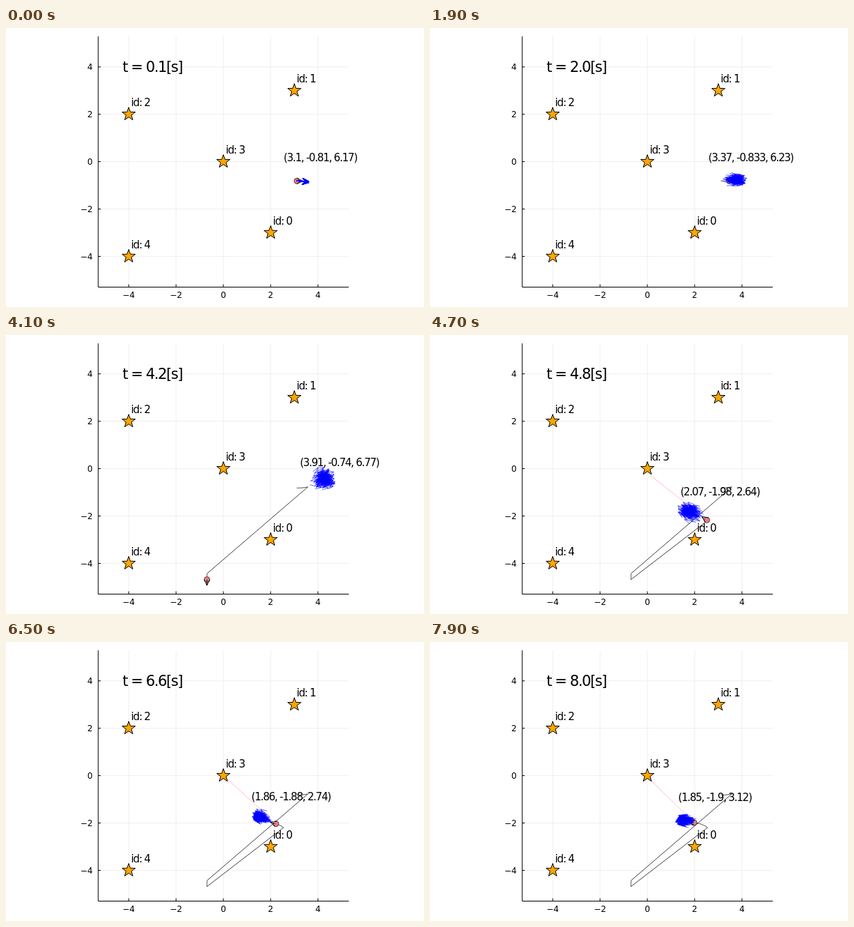
Animation, 600 px wide and 400 px high, one loop 8000 ms. Source, as an HTML page with a canvas:

```html
<!DOCTYPE html>
<html>
<head>
<meta charset="utf-8">
<style>
html, body { margin: 0; width: 100%; height: 100%; overflow: hidden; background: #fff; }
canvas { display: block; }
</style>
</head>
<body>
<canvas id="stage" width="600" height="400"></canvas>
<script>
const ctx = document.getElementById('stage').getContext('2d');
const SCALE = 33.96, SPEED = .018, RELOCATED = 46;
const px = x => 312 + SCALE * x;
const py = y => 191.6 - SCALE * y;

const landmarks = [[2, -3], [3, 3], [-4, 2], [0, 0], [-4, -4]];

// The robot drives each leg for some steps of 0.1 s, then waits to be moved.
const legs = [
  { start: 1, steps: 26, x: 3.107, y: -.815, heading: -.03, turn: .01 },
  { start: 28, steps: 14, x: -.69, y: -4.43, heading: -1.58, turn: 0 },
  { start: RELOCATED, steps: 34, x: 2.547, y: -2.19, heading: 2.55, turn: .015 }
];

function robotPath(n) {
  const path = [];
  let heading;
  for (const leg of legs.filter(leg => leg.start <= n)) {
    let { x, y } = leg;
    heading = leg.heading;
    path.push([px(x), py(y)]);
    for (let i = Math.min(n - leg.start, leg.steps); i > 0; i--) {
      x += SPEED * Math.cos(heading);
      y += SPEED * Math.sin(heading);
      heading += leg.turn;
      path.push([px(x), py(y)]);
    }
  }
  return { path, heading };
}

// Dead reckoning first, then a wobbling fix on the one landmark in view.
function estimate(n) {
  if (n >= RELOCATED) {
    const s = (n - RELOCATED) / 10;
    const wobble = -.14 * Math.cos(10 * (s - 2));
    return [2.18 - .09 * s + wobble, -2.05 + .04 * s - .65 * wobble, 2.64 + .0122 * s ** 3];
  }
  const turned = i => 6.17 + .0081 * (i / 10) ** 3;
  let x = 3.1, y = -.81;
  for (let i = 10; i <= n; i++) {
    x += .025 * Math.cos(turned(i));
    y += .025 * Math.sin(turned(i));
  }
  return [x, y, turned(n)];
}

// Particles spread while nothing is seen and gather again after a sighting.
function cloud(n) {
  if (n >= RELOCATED) {
    const extra = 4 * Math.exp((RELOCATED - n) * .3);
    return { dx: 0, dy: 0, sx: 2.6 + extra, sy: 2 + extra, turn: .17 };
  }
  const t = n / 10, grown = 1 - Math.exp(-t / 1.4);
  return { dx: 2.5 * grown, dy: -1.4 * t, sx: 4.7 * grown, sy: 1.1 * t, turn: .02 + .075 * t };
}

function random(seed) {
  return () => {
    seed = (seed + 0x6D2B79F5) | 0;
    let r = Math.imul(seed ^ seed >>> 15, seed | 1);
    r ^= r + Math.imul(r ^ r >>> 7, r | 61);
    return ((r ^ r >>> 14) >>> 0) / 4294967296;
  };
}

function line(points, color, width = 1) {
  ctx.strokeStyle = color;
  ctx.lineWidth = width;
  ctx.beginPath();
  points.forEach(p => ctx.lineTo(...p));
  ctx.stroke();
}

function fillAndOutline(fill, outline) {
  ctx.fillStyle = fill;
  ctx.fill();
  ctx.strokeStyle = outline;
  ctx.lineWidth = 1;
  ctx.stroke();
}

function arrow(x, y, angle, length, color) {
  const c = Math.cos(angle), s = -Math.sin(angle);
  const point = (along, across) => [x + c * along - s * across, y + s * along + c * across];
  const tip = point(length, 0);
  line([[x, y], tip], color);
  line([point(length - 8.5, 4), tip, point(length - 8.5, -4)], color);
}

function text(str, x, y, size, spacing = 0, align = 'center') {
  ctx.font = size + 'px "DejaVu Sans", sans-serif';
  ctx.letterSpacing = spacing + 'px';
  ctx.textAlign = align;
  ctx.fillStyle = '#000';
  ctx.fillText(str, x, y + size * .364);
}

function star(x, y) {
  ctx.beginPath();
  for (let i = 0; i < 10; i++) {
    const r = i % 2 ? 4 : 10, a = i * Math.PI / 5;
    ctx.lineTo(x + r * Math.sin(a), y - r * Math.cos(a));
  }
  ctx.closePath();
  fillAndOutline('#ffa500', '#000');
}

function drawAxes() {
  for (let v = -4; v <= 4; v += 2) {
    const x = px(v), y = py(v);
    line([[x, 12], [x, 371]], '#eee');
    line([[132, y], [492, y]], '#eee');
    line([[x, 371], [x, 367.5]], '#000');
    line([[132, y], [136, y]], '#000');
    const label = String(v).replace('-', '\u2212');
    text(label, x, 383, 12);
    text(label, 124.5, y + .3, 12, 0, 'right');
  }
  line([[132.3, 12], [132.3, 371.5], [492, 371.5]], '#000');
}

function drawRobot(n) {
  const { path, heading } = robotPath(n);
  const [x, y] = path[path.length - 1];
  line(path, '#000', .75);
  ctx.beginPath();
  ctx.arc(x, y, 4, 0, 7);
  fillAndOutline('#f08080', 'rgba(0,0,0,.65)');
  arrow(x, y, heading, 8.5, '#000');
  if (n >= RELOCATED) {
    const rnd = random(n * 31);
    line([[x, y], [312 + 11 * rnd(), 190 + 12 * rnd()]], '#ffc0cb');
  }
}

function drawCloud(n, [x, y, heading]) {
  const { dx, dy, sx, sy, turn } = cloud(n);
  const rnd = random(n < RELOCATED ? 7 : n);
  const gauss = () => (rnd() + rnd() + rnd() + rnd() - 2) * 1.73;
  for (let i = 0; i < 100; i++) {
    arrow(px(x) + dx + sx * gauss(), py(y) + dy + sy * gauss(),
      heading + turn * gauss(), 17, 'rgba(0,0,255,.6)');
  }
}

function draw(n) {
  ctx.fillStyle = '#fff';
  ctx.fillRect(0, 0, 600, 400);
  drawAxes();
  drawRobot(n);
  landmarks.forEach(([x, y], id) => {
    star(px(x), py(y));
    text('id: ' + id, px(x + .5), py(y + .5), 15, -1.2);
  });
  const pose = estimate(n);
  drawCloud(n, pose);
  const label = pose.map(v => +v.toPrecision(3)).join(', ');
  text(`(${label})`, px(pose[0] + 1), py(pose[1] + 1), 15, -1.2);
  text(`t = ${(n / 10).toFixed(1)}[s]`, px(-3), py(4), 21, -1.4);
}

const start = performance.now();
function tick() {
  draw(Math.floor((performance.now() - start) % 8000 / 100) + 1);
  requestAnimationFrame(tick);
}
tick();
</script>
</body>
</html>
```
